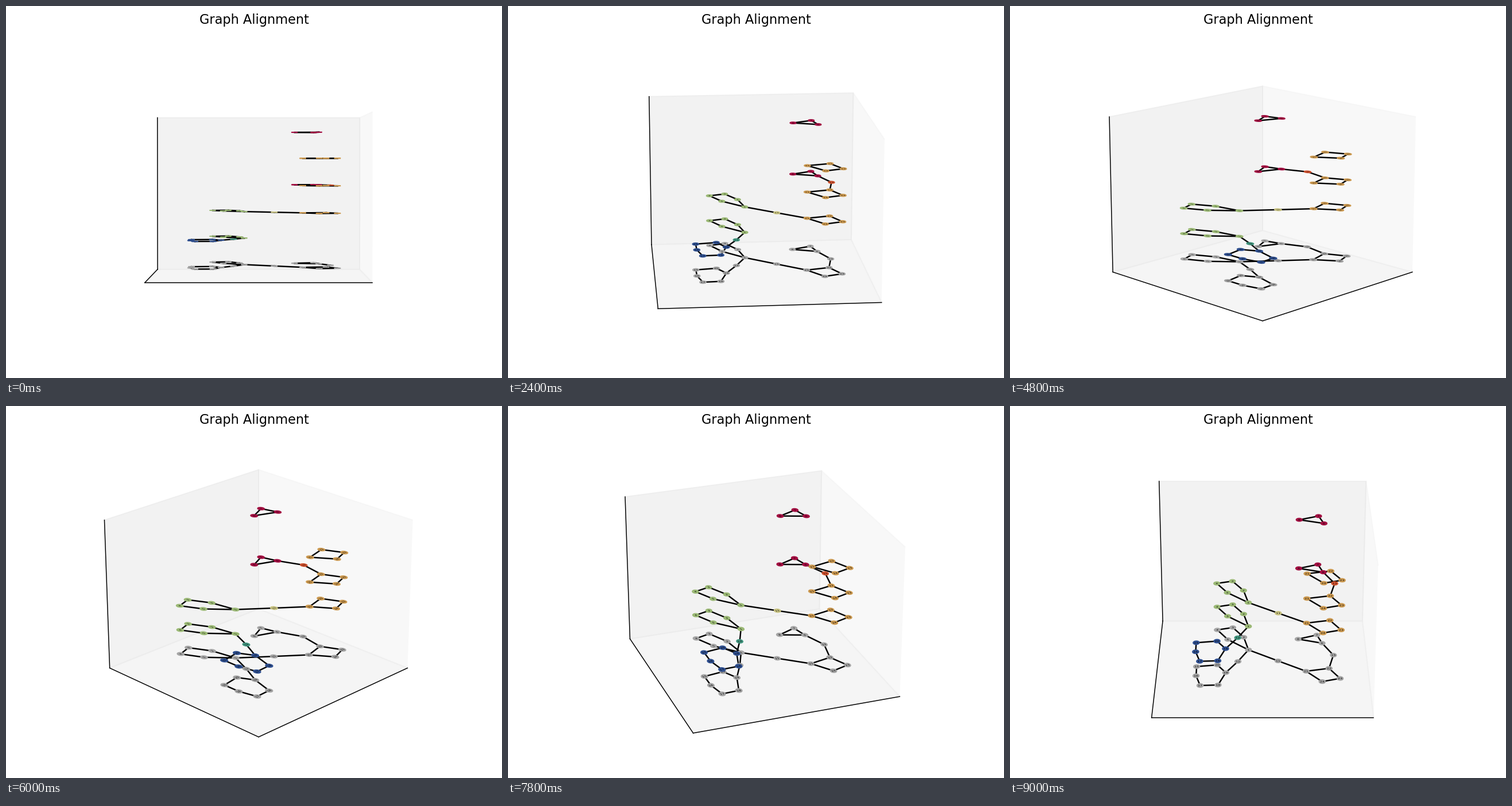
These frames come from a looping animation (864x648 px, 9.3 s). A matplotlib script:

```python
import numpy as np
import matplotlib.pyplot as plt
from matplotlib.animation import FuncAnimation
from matplotlib.collections import LineCollection, PathCollection
from matplotlib.patches import Polygon
from matplotlib.path import Path
from matplotlib.textpath import TextPath

W, H, DPI = 864, 648, 135
CX, CY, SCALE, DIST = 440, 329.8, 3135, 10
HALF, HALF_Z = 0.5952, 0.4464
Z0, DZ = -0.391, 0.149
RX, RY, FONT = 0.017, 0.0213, 0.02
GRAY = "#a5a5a5"

# Each group is a ring: colour, first label, points as (right, toward viewer)
GROUPS = {
    "B": ("#2f5091", 15, [(-.369, .1045), (-.3685, .216), (-.3425, .331),
                          (-.2445, .325), (-.2045, .178), (-.254, .0847)]),
    "T": ("#41967f", 12, [(-.139, .042)]),
    "G": ("#9bb975", 1, [(-.0805, -.103), (-.109, -.265), (-.1743, -.393),
                         (-.264, -.3617), (-.2007, -.2355)]),
    "Y": ("#c8c382", 11, [(.087, .035)]),
    "O": ("#cd9a50", 21, [(.242, .1613), (.371, .1263),
                          (.428, .2474), (.328, .285)]),
    "P": ("#d1522f", 13, [(.401, -.037)]),
    "R": ("#a30f42", 6, [(.3415, -.1885), (.3145, -.295), (.205, -.241)]),
}
LINKS = [("B4", "T0"), ("T0", "G0"), ("G0", "Y0"),
         ("Y0", "O0"), ("O1", "P0"), ("P0", "R0")]
LAYERS = ["BTGYOPR", "BTG", "GYO", "OPR", "O", "R"]


def camera(i):
    """Elevation and turn in degrees: tilt, turn, tilt, turn back."""
    elev = 1 + 2 * np.clip(i, 0, 7) + 2 * np.clip(i - 16, 0, 5)
    turn = 5 * np.clip(i - 7, 0, 9) - 5 * np.clip(i - 21, 0, 9)
    return np.radians(elev), np.radians(turn)


def project(pts, elev, turn):
    """Return pixel positions and distances from the eye."""
    x, y, z = np.moveaxis(np.asarray(pts, float), -1, 0)
    side = x * np.cos(turn) + y * np.sin(turn)
    near = y * np.cos(turn) - x * np.sin(turn)
    dist = DIST - near * np.cos(elev) - z * np.sin(elev)
    up = z * np.cos(elev) - near * np.sin(elev)
    px = np.stack([CX + SCALE * side / dist, CY - SCALE * up / dist], -1)
    return px, dist


def label_shape(text):
    path = TextPath((0, 0), text, size=1)
    box = path.get_extents()
    v = path.vertices - (box.p0 + box.p1) / 2
    return v * [FONT, -FONT * RY / RX], path.codes


def lift(flat, center):
    z = np.zeros((len(flat), 1))
    return np.hstack([flat, z]) + center


a = np.linspace(0, 2 * np.pi, 33)
DISC = np.column_stack([RX * np.cos(a), RY * np.sin(a)])

nodes, edges = [], []
for level, names in enumerate(LAYERS):
    z = Z0 + DZ * level
    pos = {}
    for g in names:
        color, first, ring = GROUPS[g]
        for k, (x, y) in enumerate(ring):
            c = np.array([x, y, z])
            pos[f"{g}{k}"] = c
            flat, codes = label_shape(str(first + k))
            nodes.append((c, lift(DISC, c), lift(flat, c), codes,
                          color if level else GRAY))
        n = len(ring)
        if n > 1:
            edges += [(pos[f"{g}{k}"], pos[f"{g}{(k + 1) % n}"])
                      for k in range(n)]
    edges += [(pos[p], pos[q]) for p, q in LINKS if p in pos and q in pos]
edges = np.array(edges)
centers = np.array([n[0] for n in nodes])


def corner(x, y, z):
    return (x * HALF, y * HALF, z * HALF_Z)


WALLS = [
    (0.95, [corner(1, 1, -1), corner(1, -1, -1),
            corner(1, -1, 1), corner(1, 1, 1)]),
    (0.90, [corner(-1, -1, -1), corner(1, -1, -1),
            corner(1, -1, 1), corner(-1, -1, 1)]),
    (0.925, [corner(-1, 1, -1), corner(1, 1, -1),
             corner(1, -1, -1), corner(-1, -1, -1)]),
]
AXES = np.array([
    (corner(-1, 1, -1), corner(1, 1, -1)),
    (corner(-1, 1, -1), corner(-1, -1, -1)),
    (corner(-1, -1, -1), corner(-1, -1, 1)),
])

fig = plt.figure(figsize=(W / DPI, H / DPI), dpi=DPI, facecolor="white")
fig.suptitle("Graph Alignment", fontsize=12, family="DejaVu Sans")
ax = fig.add_axes([0, 0, 1, 1])
ax.set(xlim=(0, W), ylim=(H, 0))
ax.axis("off")

walls = []
for shade, _ in WALLS:
    wall = Polygon(np.zeros((4, 2)), closed=False, lw=1, alpha=0.5,
                   fc=str(shade), ec=str(shade), zorder=1)
    walls.append(ax.add_patch(wall))
frame_lines = LineCollection([], colors="k", linewidths=0.8,
                             capstyle="projecting", zorder=2)
edge_lines = LineCollection([], colors="k", linewidths=1.3,
                            capstyle="projecting", zorder=3)
discs = PathCollection([], zorder=4)
for coll in (frame_lines, edge_lines, discs):
    ax.add_collection(coll, autolim=False)


def draw(i):
    view = camera(i)
    for wall, (_, pts) in zip(walls, WALLS):
        wall.set_xy(project(pts, *view)[0])
    frame_lines.set_segments(project(AXES, *view)[0])
    edge_lines.set_segments(project(edges, *view)[0])

    paths, fills, rims, widths = [], [], [], []
    for k in np.argsort(-project(centers, *view)[1], kind="stable"):
        _, disc, text, codes, color = nodes[k]
        paths += [Path(project(disc, *view)[0]),
                  Path(project(text, *view)[0], codes)]
        fills += [color, "k"]
        rims += [color, "none"]
        widths += [1, 0]
    discs.set_paths(paths)
    discs.set_facecolor(fills)
    discs.set_edgecolor(rims)
    discs.set_linewidth(widths)
    return [*walls, frame_lines, edge_lines, discs]


anim = FuncAnimation(fig, draw, frames=31, interval=300,
                     repeat=True, repeat_delay=0, blit=False)
plt.show()
```
